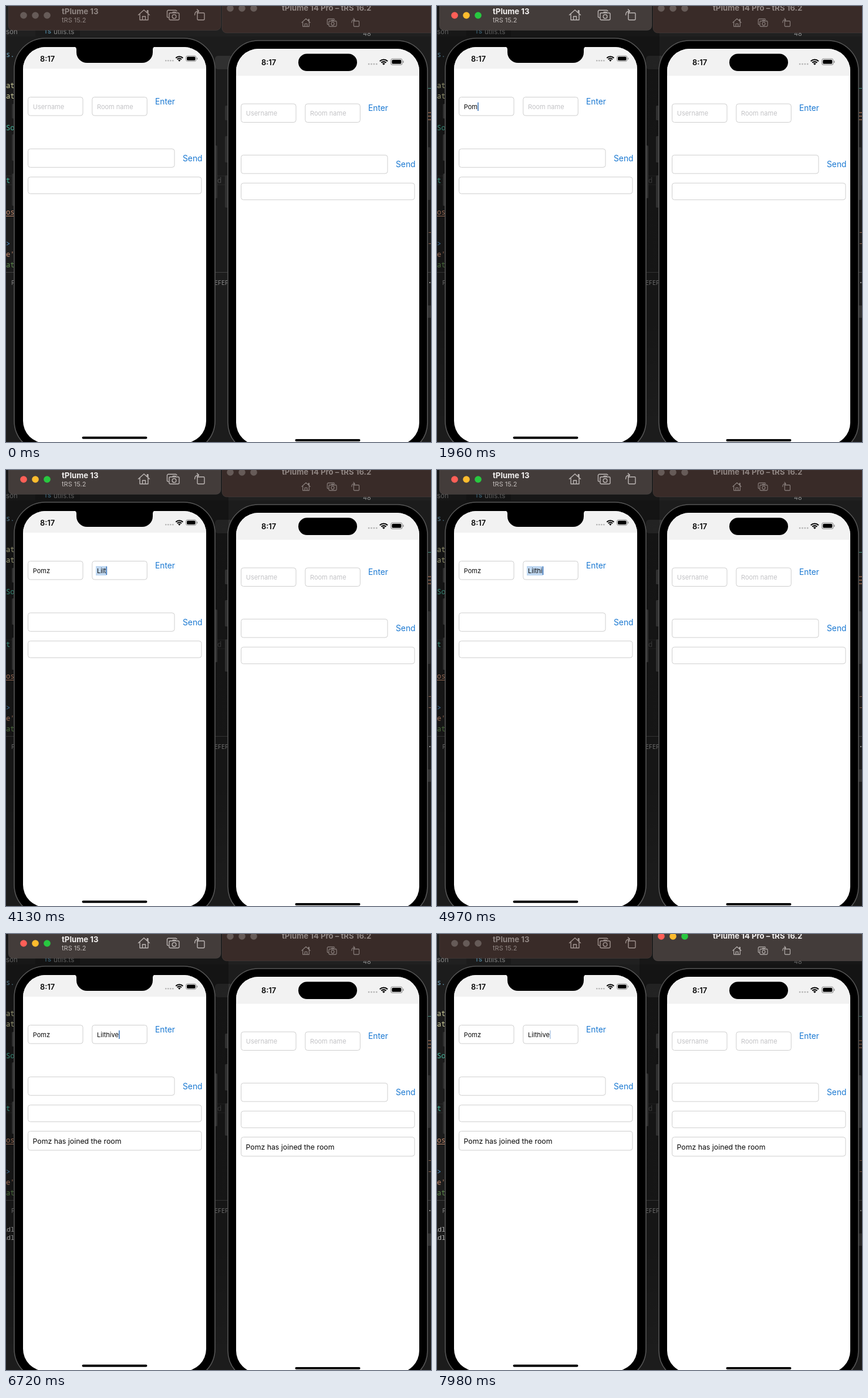
An HTML page with a canvas for the animation above (8000 ms loop, 724 px wide and 744 px high).

```html
<!DOCTYPE html>
<html lang="en">
<head>
<meta charset="utf-8">
<title>Chat room on two phones</title>
<style>
  html, body { margin: 0; width: 100%; height: 100%; overflow: hidden; background: #1b1b1b; }
  canvas { display: block; }
</style>
</head>
<body>
<canvas id="stage" width="724" height="744"></canvas>
<script>
const ctx = document.getElementById('stage').getContext('2d');
const LOOP = 8000;
const SANS = 'Inter, "Noto Sans", sans-serif';
const MONO = '"Noto Sans Mono", "DejaVu Sans Mono", monospace';
const USER = 'Pomz', ROOM = 'Lilthive';
const BLUE = '#1b79d2';

// Timelines: [start ms, value], each held until the next entry
const leftFocus = [[0, false], [840, true], [7980, false]];
const userLength = [[0, 0], [1680, 1], [1820, 2], [1960, 3], [2030, 4]];
const roomLength = [[0, 0], [3080, 1], [3290, 2], [3500, 3], [3850, 4], [4480, 3], [4550, 2],
  [4690, 4], [4760, 5], [4970, 6], [5180, 7], [5250, 8]];
const marked = [[0, false], [4130, true], [5250, false]];
const userCaret = [[0, 0], [980, 1], [1540, .5], [1610, 0], [1680, 1], [2590, .5], [2660, 0]];
const roomCaret = [[0, 0], [2730, 1], [5880, .5], [5950, 0], [6230, .35], [6300, .7], [6370, 1],
  [6930, .5], [7000, 0], [7210, .35], [7280, .7], [7350, 1], [7910, .65], [7980, .4]];
const enterAlpha = [[0, 1], [6300, .2], [6510, .4], [6580, .65], [6650, .85], [6720, 1]];
const joined = [[0, false], [6580, true]];

function at(timeline, t) {
  let value = timeline[0][1];
  for (const [start, v] of timeline) if (t >= start) value = v;
  return value;
}

function box(x, y, w, h, r, fill, stroke, line = 1) {
  ctx.beginPath();
  ctx.roundRect(x, y, w, h, r);
  if (fill) { ctx.fillStyle = fill; ctx.fill(); }
  if (stroke) { ctx.strokeStyle = stroke; ctx.lineWidth = line; ctx.stroke(); }
}

function dot(x, y, r, fill) {
  ctx.beginPath();
  ctx.arc(x, y, r, 0, Math.PI * 2);
  ctx.fillStyle = fill;
  ctx.fill();
}

function text(s, x, y, size, color, weight = 400, family = SANS) {
  ctx.font = `${weight} ${size}px ${family}`;
  ctx.fillStyle = color;
  ctx.fillText(s, x, y);
}

function code(s, x, y, color, size = 12) {
  text(s, x, y, size, color, 400, MONO);
}

function drawEditor(t) {
  box(0, 0, 724, 744, 0, '#1c1c1c');
  box(0, 0, 724, 52, 0, '#202020');
  box(50, 36, 76, 16, 0, '#1b1b1b');
  text('son', 0, 48, 11.5, '#858585');
  text('TS', 65, 47, 9, '#4d7e96', 700);
  text('utils.ts', 81, 48, 11.5, '#858585');
  text('48', 608, 51, 11, '#8c8c8c');
  box(356, 85, 30, 23, 5, '#303030');

  box(0, 290, 724, 15, 0, null, '#2b2b2b');
  code('s.', 0, 87, '#6fa8c4');
  code('at', 0, 140, '#d0cf9c');
  code('at', 0, 158, '#d0cf9c');
  code('So', 0, 212, '#45b89f');
  code('t', 0, 302, '#45b89f');
  code('d', 360, 302, '#4a4a4a');
  code('os', 0, 356, '#c58a6c');
  box(0, 358, 14, 1, 0, '#c58a6c');
  code('>', 0, 410, '#4f94cd');
  code("e'", 0, 428, '#c58a6c');
  code('at', 0, 446, '#5e8a4c');

  box(0, 454, 724, 1, 0, '#414141');
  text('P', 9, 476, 10, '#8c8c8c');
  text('EFEF', 355, 476, 10, '#8c8c8c');
  dot(722, 472, 1, '#b0b0b0');
  if (at(joined, t)) {
    code('Adl', -6, 508, '#b8b8b8', 11.5);
    code('Adl', -6, 522, '#b8b8b8', 11.5);
  }

  box(719, 140, 5, 1, 0, '#3b8c7b');
  for (const y of [181, 187, 193]) box(719, y, 5, 2, 0, '#75503d');
  for (const y of [386, 405]) box(720, y, 4, 1, 0, '#8a5f49');
  box(718, 511, 6, 21, 0, '#343434');
}

function drawShadow(left) {
  const g = ctx.createLinearGradient(0, 0, 0, 715);
  g.addColorStop(0, 'rgba(0,0,0,.3)');
  g.addColorStop(.75, 'rgba(0,0,0,.22)');
  g.addColorStop(1, 'rgba(0,0,0,0)');
  ctx.fillStyle = g;
  ctx.fillRect(left ? 0 : 345, 0, 379, 715);
}

function drawIcon(x, y, scale, color, draw) {
  ctx.save();
  ctx.translate(x, y);
  ctx.scale(scale, scale);
  ctx.strokeStyle = color;
  ctx.lineWidth = 1.4;
  ctx.lineJoin = ctx.lineCap = 'round';
  ctx.beginPath();
  draw();
  ctx.stroke();
  ctx.restore();
}

function poly(...points) {
  points.forEach(([x, y], i) => i ? ctx.lineTo(x, y) : ctx.moveTo(x, y));
}

function home() {
  poly([-9.5, 0], [0, -8.5], [9.5, 0]);
  poly([-7, -2], [-7, 8.5], [7, 8.5], [7, -2]);
  poly([-2.5, 8.5], [-2.5, 2.5], [2.5, 2.5], [2.5, 8.5]);
  poly([5.5, -4], [5.5, -7.5], [7, -7.5], [7, -3]);
}

function camera() {
  poly([-8, 4.5], [-10, 3.5], [-10, -6.5], [-8.5, -8], [5, -8], [6.5, -6.5]);
  ctx.roundRect(-6.5, -3.5, 17, 12, 2);
  poly([-1, -3.5], [0, -5.2], [4, -5.2], [5, -3.5]);
  ctx.moveTo(5.3, 2.6);
  ctx.arc(2, 2.6, 3.3, 0, Math.PI * 2);
}

function rotate() {
  ctx.roundRect(-3.5, -3.5, 12, 12, 1.5);
  ctx.moveTo(-8, 0);
  ctx.quadraticCurveTo(-8, -6.5, -1.5, -6.5);
  poly([-4, -9.5], [-1, -6.5], [-4, -3.5]);
}

function drawBar(bar, active) {
  box(bar.x, -20, bar.w, bar.bottom + 20, 8, active ? '#433c3a' : '#392b28', 'rgba(255,255,255,.07)');
  const lights = active ? ['#ff5f57', '#febc2e', '#28c840'] : Array(3).fill('#665b58');
  lights.forEach((c, i) => dot(bar.lightX + i * 20, bar.lightY, 5.8, c));
  text(bar.title, bar.titleX, bar.titleY, 13.2, active ? '#f1efee' : '#8f8582', 700);
  if (bar.sub) text(bar.sub, bar.titleX, 28, 11, active ? '#c2bcba' : '#8f8582');
  const color = active ? '#bcb6b4' : bar.iconColor;
  [home, camera, rotate].forEach((icon, i) =>
    drawIcon(bar.icons[i], bar.iconY, bar.scale, color, icon));
}

// Signal dots, wifi and battery, laid out leftwards from their bottom right corner
function drawStatusIcons(right, bottom, scale) {
  ctx.save();
  ctx.translate(right, bottom);
  ctx.scale(scale, scale);
  for (let i = 0; i < 4; i++) dot(-54 + i * 4, -1.3, 1.3, '#b5b5b5');
  const cx = -31, cy = .3;
  ctx.strokeStyle = '#000';
  ctx.lineWidth = 2;
  for (const r of [8.5, 5.2]) {
    ctx.beginPath();
    ctx.arc(cx, cy, r, -Math.PI * .75, -Math.PI * .25);
    ctx.stroke();
  }
  ctx.beginPath();
  ctx.moveTo(cx, cy);
  ctx.arc(cx, cy, 3, -Math.PI * .75, -Math.PI * .25);
  ctx.fillStyle = '#000';
  ctx.fill();
  box(-19.8, -9.5, 17.5, 9.5, 3, null, '#8e8e8e');
  box(-18.3, -8, 14.5, 6.5, 1.7, '#000');
  box(-1.3, -6.5, 1.3, 3.5, 1, '#8e8e8e');
  ctx.restore();
}

function drawNotch(x, y) {
  ctx.beginPath();
  ctx.moveTo(x - 5, y - 1);
  ctx.arcTo(x, y - 1, x, y + 27, 5);
  ctx.arcTo(x, y + 27, x + 130, y + 27, 18);
  ctx.arcTo(x + 130, y + 27, x + 130, y - 1, 18);
  ctx.arcTo(x + 130, y - 1, x + 135, y - 1, 5);
  ctx.lineTo(x + 135, y - 1);
  ctx.fillStyle = '#000';
  ctx.fill();
}

function drawField(x, y, w, h) {
  box(x + .5, y, w, h, 4, '#fff', '#cfcfcf');
}

function drawInput(x, y, hint, value = '', caret = 0, mark = false) {
  drawField(x, y, 93.5, 31.5);
  const tx = x + 8.7, base = y + 20.2;
  ctx.font = `400 11px ${SANS}`;
  const width = ctx.measureText(value).width;
  if (mark) box(tx - 2, y + 8.5, width + 3, 16, 0, '#c0d8f1');
  text(value || hint, tx, base, 11, value ? '#080808' : '#c3c3c6');
  if (caret) {
    ctx.globalAlpha = caret;
    box(tx + width + (value ? .3 : 0), y + 9, 1.5, 14.5, 0, '#3571b8');
    ctx.globalAlpha = 1;
  }
}

function drawPhone(p, state) {
  const { x, top, rows, bezel } = p;
  for (const [dy, h] of [[97, 25], [149, 45], [216, 55]]) box(x - 19, top + dy, 6, h, 1.5, '#303030');
  box(x + 326, top + 168, 5, 90, 1.5, '#303030');
  box(x - bezel, top - bezel, 312 + bezel * 2, 676 + bezel * 2, 38 + bezel, '#000', '#555', 1.6);

  ctx.save();
  ctx.beginPath();
  ctx.roundRect(x, top, 312, 676, 38);
  ctx.clip();
  box(x, top, 312, 676, 0, '#fff');
  box(x, top, 312, p.header - top, 0, '#f2f2f2');
  ctx.restore();

  if (p.island) box(x + 106, 81.5, 100, 29.5, 15, '#000');
  else drawNotch(x + 91, top);
  text('8:17', p.clockX, p.status, 12.8, '#050505', 600);
  drawStatusIcons(p.iconsRight, p.status, p.iconScale);

  drawInput(x + 8, rows[0], 'Username', state.user, state.userCaret);
  drawInput(x + 117.3, rows[0], 'Room name', state.room, state.roomCaret, state.marked);
  ctx.globalAlpha = state.enter;
  text('Enter', x + 225, rows[0] + 12.3, 13.8, BLUE);
  ctx.globalAlpha = 1;
  drawField(x + 8, rows[1], 249.5, 31.5);
  text('Send', x + 272, rows[1] + 21, 13.8, BLUE);
  drawField(x + 8, rows[2], 295.5, 28.5);
  if (state.joined) {
    drawField(x + 8, rows[3], 295.5, 32.5);
    text(`${USER} has joined the room`, x + 16.5, rows[3] + 21, 12.3, '#080808');
  }
  box(x + 100.5, p.homeY, 111, 4, 2, '#000');
}

const bars = [
  { x: 4, w: 362, bottom: 41.5, lightX: 30, lightY: 16, title: 'tPlume 13', titleX: 95, titleY: 14,
    sub: 'tRS 15.2', icons: [235, 284.5, 329.5], iconY: 15.3, scale: 1, iconColor: '#a0938f' },
  { x: 368, w: 370, bottom: 46, lightX: 382, lightY: 4, title: 'tPlume 14 Pro – tRS 16.2', titleX: 470,
    titleY: 8, icons: [511, 555, 595], iconY: 28.3, scale: .77, iconColor: '#8f8582' }
];
const phones = [
  { x: 29, top: 70, bezel: 15, header: 107, status: 94.5, clockX: 58, iconsRight: 326.3, iconScale: 1,
    homeY: 734.7, rows: [155.5, 243.8, 291.8, 336.5] },
  { x: 392, top: 73, bezel: 14, header: 119, status: 100.5, clockX: 435, iconsRight: 677.5, iconScale: 1.1,
    homeY: 739, rows: [167, 254.4, 302.2, 346.6], island: true }
];

function draw(t) {
  const left = at(leftFocus, t);
  const hasJoined = at(joined, t);
  ctx.clearRect(0, 0, 724, 744);
  drawEditor(t);
  if (t >= 840) drawShadow(left);
  drawBar(bars[0], left);
  drawBar(bars[1], t >= 7980);
  drawPhone(phones[0], {
    user: USER.slice(0, at(userLength, t)),
    room: ROOM.slice(0, at(roomLength, t)),
    userCaret: at(userCaret, t),
    roomCaret: at(roomCaret, t),
    marked: at(marked, t),
    enter: at(enterAlpha, t),
    joined: hasJoined
  });
  drawPhone(phones[1], { enter: 1, joined: hasJoined });
}

function tick() {
  draw(performance.now() % LOOP);
  requestAnimationFrame(tick);
}
tick();
</script>
</body>
</html>
```
